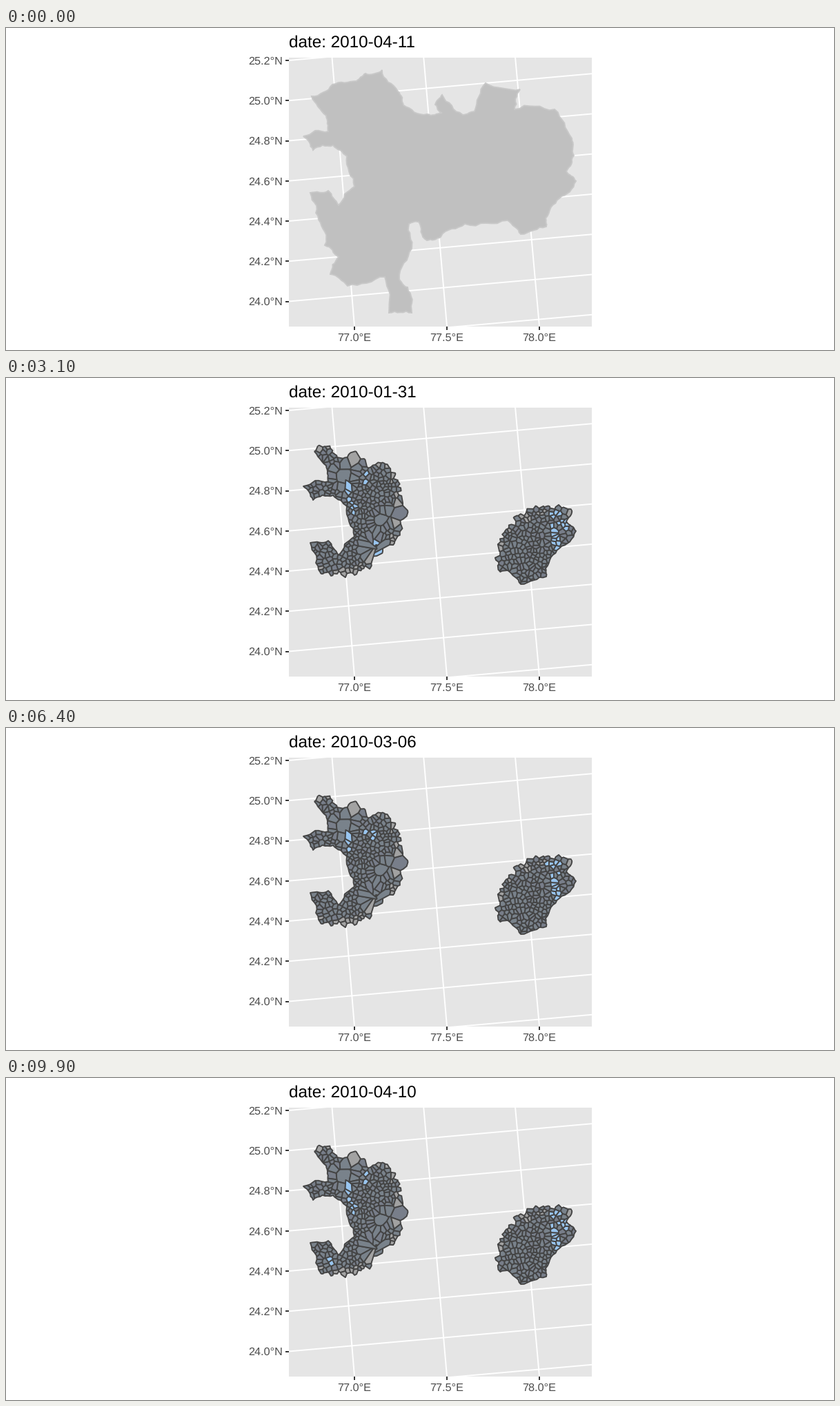
These frames come from a looping animation (1200 by 467 pixels, 10000 ms). A matplotlib script:

```python
import numpy as np
import matplotlib.pyplot as plt
from matplotlib.animation import FuncAnimation
from matplotlib.collections import PolyCollection
from matplotlib.patches import Polygon, Rectangle
from matplotlib.path import Path

W, H, DPI = 1200, 467, 100
PX = 72 / DPI
FRAMES = 100
CYCLE = 82  # days after which the lit pattern returns
SLATE, DUSK, GREY, BLUE = "#79828b", "#787e8a", "#a2a2a2", "#99c5ef"
EDGE, PANEL = "#444444", "#e5e5e5"
X0, X1, Y0, Y1 = 410, 849, 43, 432.5

rng = np.random.default_rng(11)
plt.rcParams.update({"font.family": "Liberation Sans", "text.hinting": "none"})

# Key points of the district border, clockwise in stage pixels
BORDER = [
    (443, 99), (473, 82), (508, 77), (521, 66), (545, 61), (568, 92), (576, 112),
    (610, 125), (632, 123), (622, 111), (632, 97), (662, 126), (679, 121),
    (695, 80), (745, 89), (737, 118), (795, 118), (820, 160), (823, 185),
    (812, 208), (826, 222), (802, 247), (782, 276), (783, 288), (746, 299),
    (727, 279), (665, 284), (630, 303), (610, 308), (598, 281), (584, 284),
    (588, 320), (570, 364), (582, 376), (588, 413), (555, 413), (549, 361),
    (495, 374), (470, 357), (482, 332), (462, 315), (453, 278), (441, 239),
    (467, 236), (482, 257), (505, 230), (494, 186), (474, 170), (445, 177),
    (431, 157), (467, 150), (464, 127), (443, 99)]

# Villages are kept inside two circles, less a bite in the north
CIRCLES = [(480, 190, 95), (790, 266, 79)]
BITE = (525, 42, 83)
# Large villages: centre and clearance
BIG = [(489, 142, 19), (533, 246, 22), (541, 206, 15), (571, 196, 19), (504, 117, 16)]
# Lit areas: centre, radii, first and last day of the cycle
GLOWS = [
    (518, 145, 6, 14, 8, 42), (529, 153, 11, 8, 45, 71), (544, 179, 15, 9, 74, 82),
    (497, 158, 6, 27, 0, 82), (504, 188, 5, 9, 9, 53), (474, 266, 6, 12, 10, 25),
    (533, 246, 6, 6, 28, 38), (796, 220, 7, 34, 0, 82), (813, 209, 7, 10, 5, 43),
    (823, 229, 5, 7, 46, 86), (750, 247, 19, 8, 46, 55), (783, 201, 6, 7, 61, 73)]


def rough(points):
    """Jagged border by midpoint displacement."""
    pts = np.array(points, float)
    while len(pts) < 400:
        a, b = pts[:-1], pts[1:]
        d = b - a
        sway = rng.uniform(-0.13, 0.13, (len(d), 1))
        mid = (a + b) / 2 + sway * d[:, ::-1] * (1, -1)
        pts = np.vstack([np.stack([a, mid], 1).reshape(-1, 2), pts[-1:]])
    return pts


def dist(pts, x, y):
    return np.hypot(pts[:, 0] - x, pts[:, 1] - y)


def scatter(outline):
    """Unevenly spaced village centres, the large ones first."""
    lo, hi = outline.min(0), outline.max(0)
    cand = rng.uniform(lo, hi, (int(np.prod(hi - lo) / 20), 2))
    cand = cand[Path(outline).contains_points(cand)]
    for x, y, room in BIG:
        cand = cand[dist(cand, x, y) > room]
    seeds = np.array(BIG, float)[:, :2]
    for p in cand:
        if dist(seeds, *p).min() > 3.5:
            seeds = np.vstack([seeds, p])
    return seeds


def half_plane(poly, mid, normal):
    """Keep the part of a convex polygon behind a line."""
    out = []
    side = [(p - mid) @ normal for p in poly]
    for k, p in enumerate(poly):
        q, s, t = poly[k - 1], side[k], side[k - 1]
        if s * t < 0:
            out.append(q + (p - q) * t / (t - s))
        if s <= 0:
            out.append(p)
    return out


def cell(p, seeds):
    """Area nearer to p than to any other centre."""
    poly = [p + np.array(c) for c in ((-25, -25), (25, -25), (25, 25), (-25, 25))]
    for q in seeds[np.argsort(dist(seeds, *p))[1:25]]:
        poly = half_plane(poly, (p + q) / 2, q - p)
    return np.array(poly)


fig = plt.figure(figsize=(W / DPI, H / DPI), dpi=DPI, facecolor="white")
ax = fig.add_axes([0, 0, 1, 1])
ax.set_xlim(0, W)
ax.set_ylim(H, 0)
ax.axis("off")


def line(xs, ys, colour, clip=None):
    art, = ax.plot(xs, ys, color=colour, lw=1.95 * PX, zorder=1,
                   solid_capstyle="butt")
    if clip is not None:
        art.set_clip_path(clip)


def label(x, y, text, ha, size=16.3, colour="#4d4d4d"):
    return ax.text(x, y, text, ha=ha, va="baseline", fontsize=size * PX, color=colour)


# Panel, graticule and axes
panel = ax.add_patch(Rectangle((X0, Y0), X1 - X0, Y1 - Y0, fc=PANEL, lw=0, zorder=0))
for k in range(8):
    y = 47 + 58.25 * k
    line([X0, X1], [y, y - 39], "white", panel)
    if k < 7:
        line([X0 - 5.2, X0], [y, y], "#333333")
        label(401, y + 5.8, f"{25.2 - 0.2 * k:.1f}°N", "right")
for k in range(3):
    x = 505 + 134 * k
    line([x - 32.5 - 1.2 * k, x], [Y0, Y1], "white", panel)
    line([x, x], [Y1, Y1 + 5.2], "#333333")
    label(x, 453.5, f"{77 + 0.5 * k:.1f}°E", "center")
title = label(X0, 28, "", "left", 24.3, "black")

# District
outline = rough(BORDER)
district = ax.add_patch(Polygon(outline, facecolor="#c0c0c0", edgecolor="#c8c8c8",
                                linewidth=1.95 * PX, zorder=2))

# Villages
every = scatter(outline)
depth = np.max([r - dist(every, x, y) for x, y, r in CIRCLES], axis=0)
keep = (depth > 0) & (dist(every, *BITE[:2]) > BITE[2])
keep[:len(BIG)] = True
seeds, depth = every[keep], depth[keep]
polys = [cell(p, every) for p in seeds]

style = dict(edgecolor=EDGE, linewidth=1.9 * PX, joinstyle="round")
villages = ax.add_collection(PolyCollection(polys, zorder=3, **style))
villages.set_clip_path(district)
rim = ax.add_patch(Polygon(outline, fill=False, zorder=4, **style))
area = Path.make_compound_path(*[Path(np.vstack([p, p[:1]]), closed=True)
                                 for p in polys])
rim.set_clip_path(area, ax.transData)

base = np.where(rng.random(len(seeds)) < 0.7, SLATE, DUSK).astype(object)
base[(depth < 9) & (rng.random(len(seeds)) < 0.35)] = GREY
base[:len(BIG)] = [SLATE, SLATE, SLATE, DUSK, GREY]
eager = rng.random(len(seeds)) < 0.7
lag = rng.uniform(-2, 2, len(seeds))


def lit(day):
    """Which villages are lit on a day; each switches a little early or late."""
    t = (day + 2) % CYCLE
    on = np.zeros(len(seeds), bool)
    for x, y, rx, ry, start, end in GLOWS:
        inside = np.hypot((seeds[:, 0] - x) / rx, (seeds[:, 1] - y) / ry) < 1
        on |= inside & (start + lag <= t) & (t <= end + lag)
    on[len(BIG):] &= eager[len(BIG):]
    return on


def draw(i):
    day = round(1 + (i - 1) % FRAMES * 100 / 99)
    title.set_text(f"date: {np.datetime64('2009-12-31') + day}")
    district.set_visible(i == 0)
    villages.set_visible(i > 0)
    rim.set_visible(i > 0)
    villages.set_facecolor(list(np.where(lit(day), BLUE, base)))
    return []


anim = FuncAnimation(fig, draw, frames=FRAMES, interval=100, repeat=True,
                     repeat_delay=0, blit=False)
plt.show()
```
